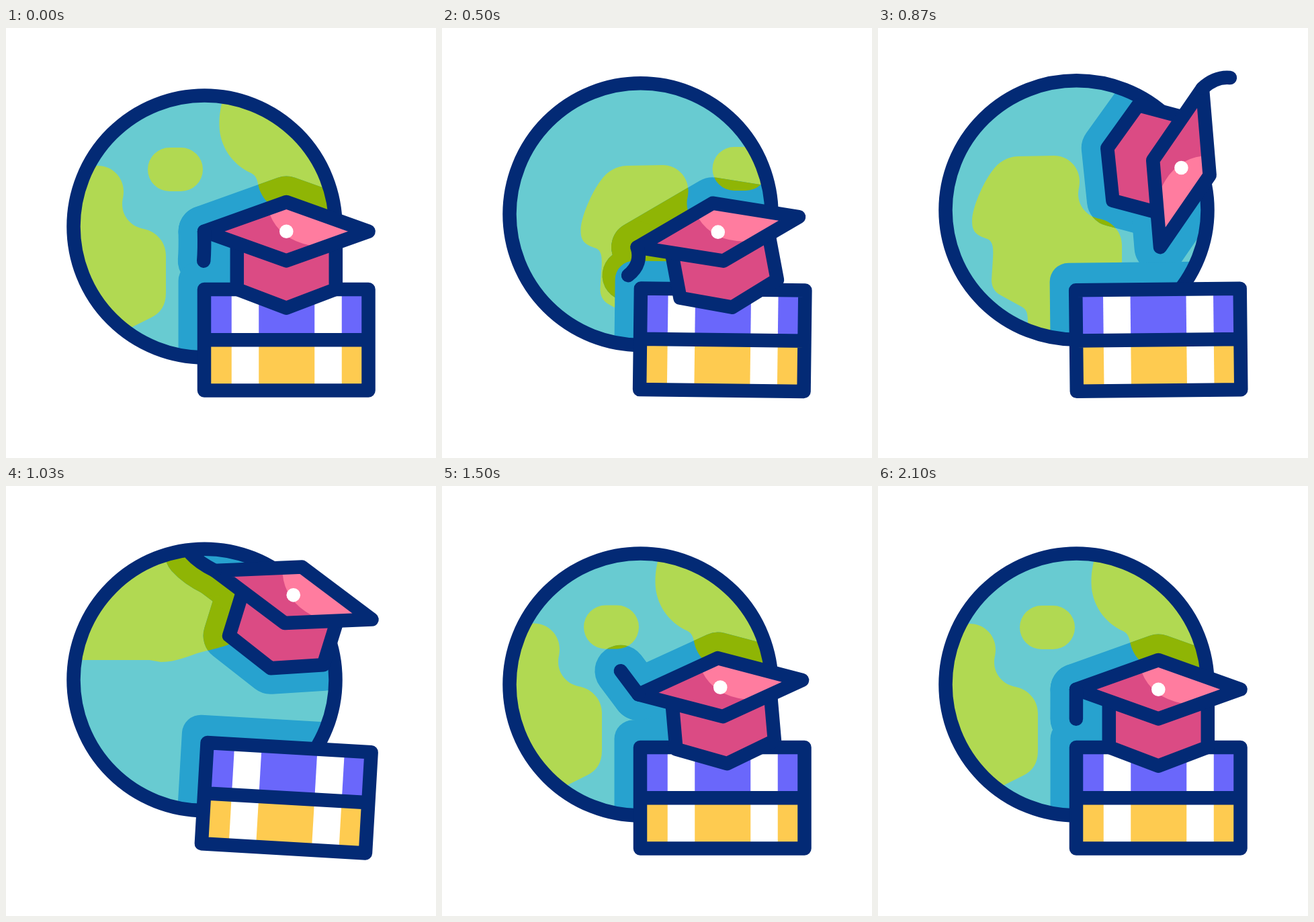
These frames come from a looping animation (640x640 px, 2200 ms). An HTML page with a canvas:

```html
<!DOCTYPE html>
<html lang="en">
<head>
<meta charset="utf-8">
<title>Globe, books and graduation cap</title>
<style>
html, body { margin: 0; width: 100%; height: 100%; overflow: hidden; background: #fff; }
canvas { display: block; }
</style>
</head>
<body>
<canvas id="stage" width="640" height="640"></canvas>
<script>
const ctx = document.getElementById('stage').getContext('2d');
const LOOP = 2200, LINE = 20.5, HALO = 77, MAP = 890, CORD = 44, RAD = Math.PI / 180;
const NAVY = '#032a75', SEA = '#68cbd1', LAND = '#b1d952', SEA_SHADE = '#27a2cf', LAND_SHADE = '#8fb505',
  PURPLE = '#6a67fb', YELLOW = '#fecb50', PINK = '#db4b84', LIGHT = '#ff7c9f', WHITE = '#fff';

const west = new Path2D(
  'M83 206 L137 205 C158 205 175 222 175 243 C175 252 173 255 173 262 C173 281 187 296 205 299' +
  'C224 303 238 319 238 338 V394 C238 413 230 424 216 431 L188 445 L130 475 V495 H98 V455' +
  'C98 441 97 434 89 430 L58 413 C47 407 44 399 44 389 L46 358 C47 340 46 331 35 328' +
  'C18 322 15 315 15 302 C15 282 32 245 44 229 C55 213 68 207 83 206Z');
const east = new Path2D(
  'M340 60 C325 95 317 118 317.5 145 C318 175 336 203 365 216 C373 220 374 227 376 236' +
  'C382 260 405 276 431 276 H580 L597 279 C621 279 636 270 658 264 C691 256 711 252 723 233' +
  'C731 220 735 209 735 197 C735 180 725 162 713 151 C701 142 686 147 671 147.5 C659 148 650 140 649 129 L650 60Z');
const land = new Path2D();
land.addPath(west);
land.addPath(east);
land.roundRect(211, 178, 82, 65, 32.5);

const books = new Path2D('M-122.25 -75.25 H122.25 V75.25 H-122.25Z M-122.25 0 H122.25');
const booksHalo = new Path2D();
booksHalo.roundRect(-160.7, -116, 321.4, 232, 28);
const body = new Path2D('M-73.5 17 V86 L0 114 L73.5 86 V17');
const board = new Path2D('M-122.3 0 L0 -43.7 L122.3 0 L0 43.7Z');
const shine = new Path2D('M-25 -26 Q-10 12 36 21 L40 29 L122.3 0 L0 -43.7 L-28 -33.7Z');

const clamp = v => Math.min(1, Math.max(0, v));
const ease = v => (1 - Math.cos(Math.PI * clamp(v))) / 2;
const pulse = (t, mid, width) => Math.exp(-(((t - mid) / width) ** 2));

// The globe spins twice while it hops; the books rock under it
function worldPose(t) {
  return {
    shift: 2 * MAP * ease(clamp((t - 200) / 1126) ** 1.173) % MAP,
    drift: -17.5 * pulse(t, 980, 280),
    cy: 295.5 - 37 * pulse(t, 710, 250),
    ry: 195 - 5 * pulse(t, 330, 130) + 2.7 * pulse(t, 630, 110) - 2.3 * pulse(t, 870, 110),
    tilt: 6.3 * Math.sin(Math.PI * clamp(t / 1270)) * Math.cos(2 * Math.PI * (t - 330) / 740)
  };
}

// The cap crouches, somersaults about a point inside it and lands with a nod
function capPose(t) {
  const angle = 19 * pulse(t, 330, 120) - 360 * ease((t - 413) / 719) - 5 * pulse(t, 1500, 70);
  const jump = 142 * Math.max(0, 1 - Math.abs((t - 1000) / 505) ** 2.85);
  const pivotY = 338 + 39 * pulse(t, 330, 120) - jump;
  const tip = 90 + 28 * pulse(t, 330, 180) + 144 * pulse(t, 880, 260) + 150 * pulse(t, 1470, 240);
  return {
    angle,
    tip,
    bend: tip - 38 * pulse(t, 600, 360),
    x: 417.3 + 35.3 * Math.sin(angle * RAD),
    y: pivotY - 35.3 * Math.cos(angle * RAD)
  };
}

function place(path, x, y, deg = 0) {
  const p = new Path2D();
  p.addPath(path, new DOMMatrix().translate(x, y).rotate(deg));
  return p;
}

function tasselPath(tip, bend) {
  const at = (deg, r) => [r * Math.cos(deg * RAD) - 122.3, r * Math.sin(deg * RAD)];
  const p = new Path2D();
  p.moveTo(-122.3, 0);
  p.quadraticCurveTo(...at(bend, CORD * 0.6), ...at(tip, CORD));
  return p;
}

function fill(path, color) {
  ctx.fillStyle = color;
  ctx.fill(path);
}

function outline(path, color = NAVY, width = LINE) {
  ctx.strokeStyle = color;
  ctx.lineWidth = width;
  ctx.stroke(path);
}

function drawBooks(tilt) {
  ctx.save();
  ctx.translate(417.25, 464.25);
  ctx.rotate(tilt * RAD);
  const box = (x, y, w, h, color) => {
    ctx.fillStyle = color;
    ctx.fillRect(x, y, w, h);
  };
  box(-122, -75, 244, 75, PURPLE);
  box(-122, 0, 244, 75, YELLOW);
  box(-81.5, -75, 40.5, 150, WHITE);
  box(42, -75, 40.5, 150, WHITE);
  outline(books);
  ctx.restore();
}

function draw(t) {
  const world = worldPose(t), cap = capPose(t);
  const globe = new Path2D();
  globe.ellipse(295.5, world.cy, 195, world.ry, 0, 0, 2 * Math.PI);
  const map = place(land, world.shift, world.drift);
  map.addPath(place(land, world.shift - MAP, world.drift));

  const inCap = path => place(path, cap.x, cap.y, cap.angle);
  const capBody = inCap(body), capBoard = inCap(board), tassel = inCap(tasselPath(cap.tip, cap.bend));
  const shade = color => [capBody, capBoard, tassel].forEach(p => {
    fill(p, color);
    outline(p, color, HALO);
  });

  ctx.fillStyle = WHITE;
  ctx.fillRect(0, 0, 640, 640);
  ctx.lineCap = ctx.lineJoin = 'round';

  // Only the cap's shadow lets the land show through
  ctx.save();
  ctx.clip(globe);
  fill(globe, SEA);
  fill(map, LAND);
  shade(SEA_SHADE);
  ctx.save();
  ctx.clip(map);
  shade(LAND_SHADE);
  ctx.restore();
  fill(place(booksHalo, 417.25, 464.25, world.tilt), SEA_SHADE);
  ctx.restore();
  outline(globe);

  drawBooks(world.tilt);

  fill(capBody, PINK);
  outline(capBody);
  fill(capBoard, PINK);
  fill(inCap(shine), LIGHT);
  outline(capBoard);
  outline(tassel);
  const button = new Path2D();
  button.arc(cap.x, cap.y, 10.3, 0, 2 * Math.PI);
  fill(button, WHITE);
}

const start = performance.now();
function tick() {
  draw((performance.now() - start) % LOOP);
  requestAnimationFrame(tick);
}
tick();
</script>
</body>
</html>
```
